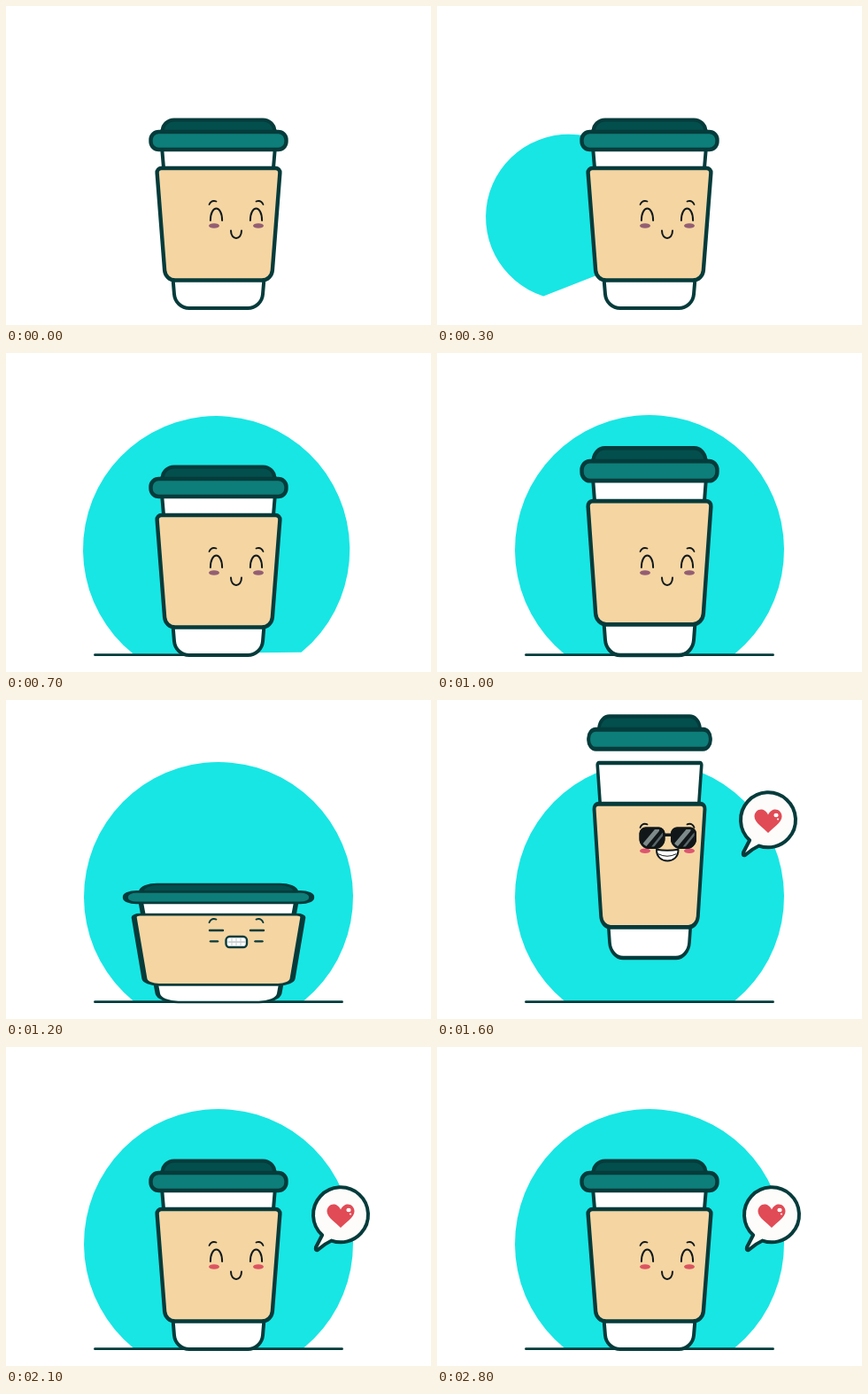
Write an HTML page with a canvas that moves like this. It is 480 px wide and 360 px high and loops after 2.9 s.

```html
<!DOCTYPE html>
<html>
<head>
<meta charset="utf-8">
<style>
html, body { margin: 0; width: 100%; height: 100%; overflow: hidden; background: #fff; }
canvas { display: block; }
</style>
</head>
<body>
<canvas id="stage" width="480" height="360"></canvas>
<script>
const ctx = document.getElementById('stage').getContext('2d');
const LOOP = 2900, STEP = 100;
const INK = '#053b3b', BLACK = '#10191c';
const FLOOR = 341, MID = 240;

const progress = (t, start, length) => Math.min(1, Math.max(0, (t - start) / length));
const easeOut = p => 1 - (1 - p) ** 3;
const easeInOut = p => p * p * (3 - 2 * p);
const shift = (t, start, amount) => amount * easeInOut(progress(t, start, 200));

function poseAt(t) {
  // Reach up, crouch, spring, land, settle
  const sy = 1 + shift(t, 800, 0.1) + shift(t, 1000, -0.474) + shift(t, 1200, 0.474)
    + shift(t, 1600, -0.3) + shift(t, 1800, 0.2);
  const sx = t <= 1000 ? 1 : 2 - sy;
  const u = progress(t, 1250, 550), arc = 4 * u * (1 - u);
  const jump = -54 * arc;
  return { sx, sy, jump, lift: 42 * arc, face: 67 * (sx - 1) + 1.47 * jump };
}

function paint(fill, stroke, width) {
  if (fill) { ctx.fillStyle = fill; ctx.fill(); }
  if (stroke) { ctx.strokeStyle = stroke; ctx.lineWidth = width; ctx.stroke(); }
}

function shape(path, fill, stroke, width) {
  ctx.beginPath();
  path();
  paint(fill, stroke, width);
}

const line = (x1, y1, x2, y2, color, width) => shape(() => {
  ctx.moveTo(x1, y1);
  ctx.lineTo(x2, y2);
}, null, color, width);

const oval = (x, y, rx, ry, color) =>
  shape(() => ctx.ellipse(x, y, rx, ry, 0, 0, 7), color);

// Arch opening downwards, or upwards when the height is negative
const arch = (x, y, half, height) => shape(() => {
  ctx.moveTo(x - half, y);
  ctx.bezierCurveTo(x - half, y - height * 1.33, x + half, y - height * 1.33, x + half, y);
}, null, BLACK, 2);

// Symmetric tapered box around the middle of the cup
function taper(topHalf, top, bottomHalf, bottom, topR, bottomR) {
  ctx.moveTo(MID, top);
  ctx.arcTo(MID + topHalf, top, MID + bottomHalf, bottom, topR);
  ctx.arcTo(MID + bottomHalf, bottom, MID, bottom, bottomR);
  ctx.arcTo(MID - bottomHalf, bottom, MID - topHalf, top, bottomR);
  ctx.arcTo(MID - topHalf, top, MID, top, topR);
  ctx.closePath();
}

function drawDisc(t) {
  const s = easeOut(progress(t, 90, 770));
  const r = 152, rise = 118, cut = Math.asin(rise / r);
  ctx.save();
  ctx.translate(88, 340);
  ctx.rotate(-0.97 * (1 - s));
  ctx.scale(s, s);
  shape(() => ctx.arc(r, -rise, r, Math.PI - cut, cut), '#18e6e4');
  ctx.restore();
}

function drawGround(t) {
  const p = easeInOut(progress(t, 470, 430));
  if (p) line(100.5, 340.7, 100.5 + 279 * p, 340.7, INK, 2.8);
}

function drawCup({ sx, sy, jump, lift }) {
  ctx.save();
  ctx.translate(MID, FLOOR + jump);
  ctx.scale(sx, sy);
  ctx.translate(-MID, -FLOOR);
  shape(() => taper(65.5, 141, 48.7, 341, 2, 17), '#fff', INK, 4);
  shape(() => taper(69.8, 183, 60, 309.5, 5, 12), '#f5d5a2', INK, 4.4);
  ctx.translate(0, -lift / sy);
  shape(() => taper(62, 128.5, 64, 146, 13, 2), '#034f4d', INK, 4);
  shape(() => ctx.roundRect(163.5, 142, 153, 20, 9), '#0d7e79', INK, 4.4);
  ctx.restore();
}

function drawBrows(color) {
  for (const side of [-1, 1]) shape(() => {
    ctx.moveTo(MID + 20 + side * 30.5, 224);
    ctx.quadraticCurveTo(MID + 20 + side * 28, 218.5, MID + 20 + side * 22.5, 220.5);
  }, null, color, 1.8);
}

function drawBlush(y, color) {
  for (const x of [235, 285]) oval(x, y, 6, 2.8, color);
}

function happy(t) {
  drawBrows(BLACK);
  for (const x of [237.5, 282.5]) arch(x, 242, 6.6, 13.5);
  arch(260, 253.5, 6, -8.5);
  drawBlush(248, t < 1200 ? '#945e73' : '#dc5361');
}

function squint() {
  ctx.translate(0, 2);
  drawBrows(INK);
  ctx.translate(0, -2);
  for (const x of [237.5, 283.5]) line(x - 7.5, 235, x + 7.5, 235, INK, 2.4);
  for (const x of [235, 285.5]) line(x - 4, 247.3, x + 4, 247.3, INK, 2.4);
  shape(() => ctx.roundRect(248.5, 242, 23.5, 12, 4), '#fff', INK, 2.4);
  line(251, 248, 270, 248, '#a3afaf', 1);
  for (const x of [255, 260, 265]) line(x, 244, x, 252, '#c6cece', 1);
}

function cool() {
  drawBrows(BLACK);
  drawBlush(250.5, '#de5570');
  line(256, 232.5, 265, 232.5, BLACK, 3.5);
  for (const x of [228.5, 264]) {
    ctx.save();
    shape(() => ctx.roundRect(x, 223.8, 29, 24.4, [7, 7, 11, 11]), '#111719');
    ctx.clip();
    line(x + 4, 246, x + 20, 227, '#7d8a89', 5);
    line(x + 15, 246, x + 27, 231, '#59676a', 2.5);
    ctx.restore();
    shape(() => ctx.roundRect(x + 1.2, 225, 26.6, 22, [6, 6, 10, 10]), null, '#111719', 2.4);
  }
  shape(() => {
    ctx.moveTo(248, 249);
    ctx.quadraticCurveTo(260, 251, 272.5, 249);
    ctx.bezierCurveTo(273, 266, 247.5, 266, 248, 249);
    ctx.closePath();
  }, '#fff', BLACK, 2);
  shape(() => {
    ctx.moveTo(250, 254);
    ctx.quadraticCurveTo(260, 259, 270, 254);
  }, null, BLACK, 1);
}

function drawFace(t, { face }) {
  ctx.save();
  ctx.translate(0, face);
  if (t >= 1200 && t < 1400) squint();
  else if (t >= 1400 && t < 1900) cool();
  else happy(t);
  ctx.restore();
}

function drawHeart(x, y) {
  ctx.save();
  ctx.translate(x, y);
  ctx.beginPath();
  ctx.moveTo(0, 13.5);
  for (const side of [1, -1]) {
    const tip = side > 0 ? -7 : 13.5;
    const curve = side > 0
      ? [5, 8, 15.5, 2, 15.5, -5]
      : [-5, -17, -15.5, -13, -15.5, -5];
    ctx.bezierCurveTo(...curve);
    if (side > 0) ctx.bezierCurveTo(15.5, -13, 5, -17, 0, tip);
    else ctx.bezierCurveTo(-15.5, 2, -5, 8, 0, tip);
  }
  paint('#e14b55');
  oval(9, -6.5, 2.6, 2.2, '#fff');
  oval(11, -2, 1.1, 1.1, '#fff');
  ctx.restore();
}

function drawBubble(t, { sx, jump }) {
  const s = easeOut(progress(t, 1300, 250));
  if (!s) return;
  const tipX = 350, tipY = 229, drift = 40 * (sx - 1);
  ctx.save();
  ctx.translate(tipX + drift, tipY + jump + drift);
  ctx.scale(s, s);
  ctx.translate(-tipX, -tipY);
  shape(() => {
    ctx.arc(378, 189.3, 31, 2.31, 1.91 + Math.PI * 2);
    ctx.quadraticCurveTo(360, 222, 352, 229);
    ctx.quadraticCurveTo(349, 230, 350, 226);
    ctx.closePath();
  }, '#fdfcfb', INK, 4);
  drawHeart(378, 190.5);
  ctx.restore();
}

function draw(t) {
  const pose = poseAt(t);
  ctx.fillStyle = '#fff';
  ctx.fillRect(0, 0, 480, 360);
  ctx.lineCap = ctx.lineJoin = 'round';
  drawDisc(t);
  drawGround(t);
  drawCup(pose);
  drawFace(t, pose);
  drawBubble(t, pose);
}

const began = performance.now();
function tick() {
  const t = (performance.now() - began) % LOOP;
  draw(Math.floor(t / STEP) * STEP);
  requestAnimationFrame(tick);
}
tick();
</script>
</body>
</html>
```
